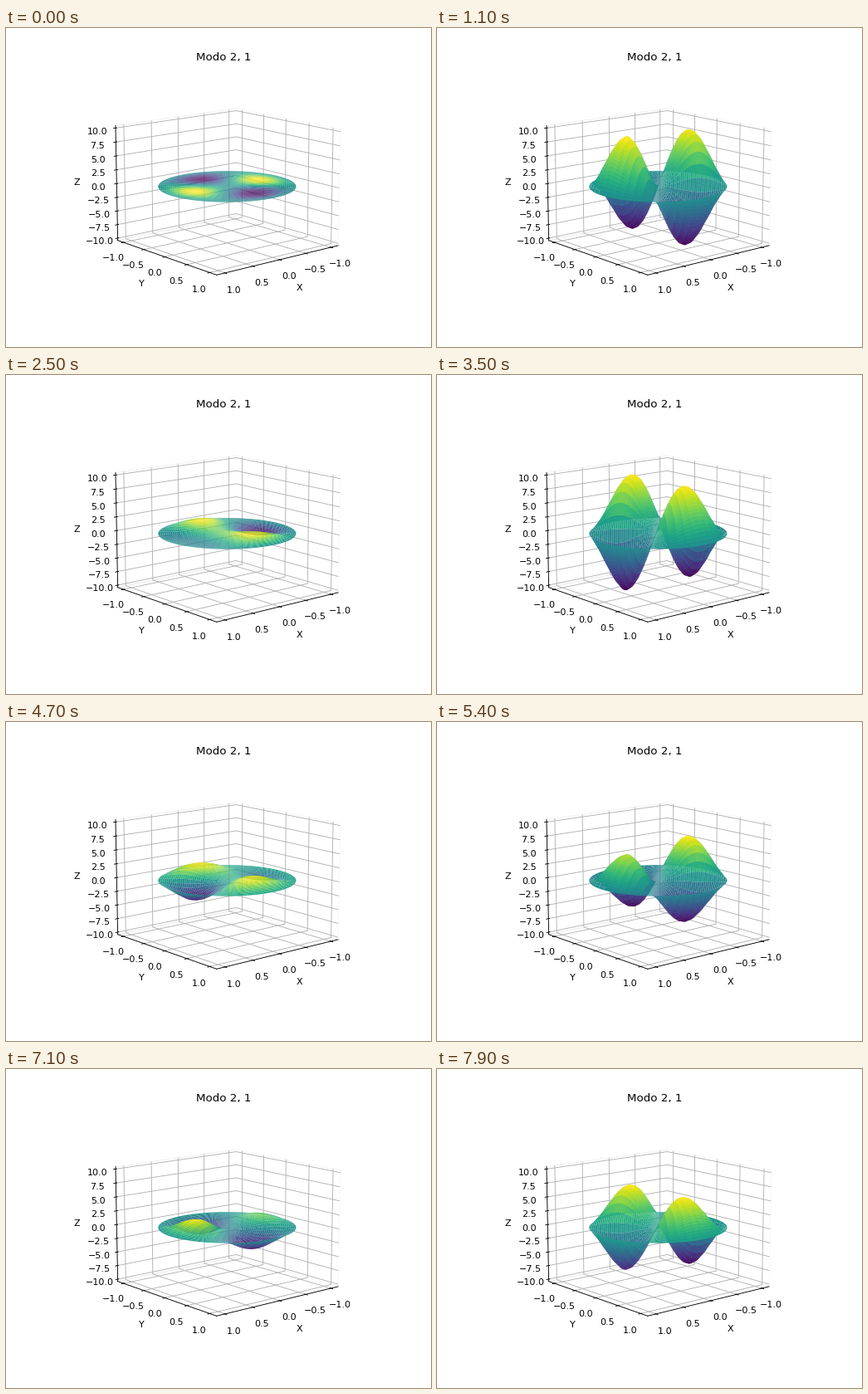
A matplotlib script that plays this animation: 512x384 px, repeating every 8000 ms.

```python
import numpy as np
import matplotlib.pyplot as plt
from matplotlib.animation import FuncAnimation

FRAMES = 80
INTERVAL = 100
SIZE = 50            # grid points along the radius and the angle
SUBSTEPS = 20
DT = 0.0255 / SUBSTEPS
ALPHA = 5.13562      # first zero of J2
SPEED = 98           # peak factor of the starting velocity

r = np.linspace(0, 1, SIZE)
theta = np.linspace(0, 2 * np.pi, SIZE)
dr, dth = r[1], theta[1]
T, R = np.meshgrid(theta, r)
X, Y = R * np.cos(T), R * np.sin(T)


def bessel(n, x):
    tau = (np.arange(400) + 0.5) * np.pi / 400
    return np.cos(n * tau - x[..., None] * np.sin(tau)).mean(axis=-1)


def accel(u):
    """Polar Laplacian by central differences, wrapped in the angle."""
    a = np.zeros_like(u)
    rad = r[1:-1, None]
    mid = u[1:-1]
    a[1:-1] = (u[2:] - 2 * mid + u[:-2]) / dr**2
    a[1:-1] += (u[2:] - u[:-2]) / (2 * dr * rad)
    ring = np.roll(mid, 1, axis=1) - 2 * mid + np.roll(mid, -1, axis=1)
    a[1:-1] += ring / (rad * dth) ** 2
    return a


def simulate():
    """Drum skin that starts flat with the velocity of mode (2, 1)."""
    v = SPEED * bessel(2, ALPHA * r)[:, None] * np.cos(2 * T)
    v[-1] = 0
    prev, u = np.zeros_like(v), DT * v
    states = []
    for _ in range(FRAMES):
        states.append(u.copy())
        for _ in range(SUBSTEPS):
            nxt = 2 * u - prev + DT**2 * accel(u)
            nxt[0] = nxt[1].mean()
            nxt[-1] = 0
            prev, u = u, nxt
    return states


def quads(z):
    p = np.stack([X, Y, z], axis=-1)
    corners = [p[:-1, :-1], p[:-1, 1:], p[1:, 1:], p[1:, :-1]]
    return np.stack(corners, axis=2).reshape(-1, 4, 3)


states = simulate()

fig = plt.figure(figsize=(6.4, 4.8), dpi=80)
ax = fig.add_subplot(projection="3d")
surface = ax.plot_surface(X, Y, states[0], cmap="viridis",
                          rstride=1, cstride=1)
ax.set_xlim(-1.1, 1.1, view_margin=1 / 48)
ax.set_ylim(-1.1, 1.1, view_margin=1 / 48)
ax.set_zlim(-10, 10, view_margin=1 / 48)
ax.view_init(elev=13, azim=50)
ax.set_xlabel("X")
ax.set_ylabel("Y")
ax.set_zlabel("Z")
ax.set_title("Modo 2, 1")
for axis in (ax.xaxis, ax.yaxis, ax.zaxis):
    axis.pane.set_fill(False)


def update(i):
    verts = quads(states[i])
    surface.set_verts(verts)
    surface.set_array(verts[:, :, 2].mean(axis=1))
    surface.autoscale()
    return (surface,)


anim = FuncAnimation(fig, update, frames=FRAMES, interval=INTERVAL,
                     repeat=True, repeat_delay=0, blit=False)
plt.show()
```
